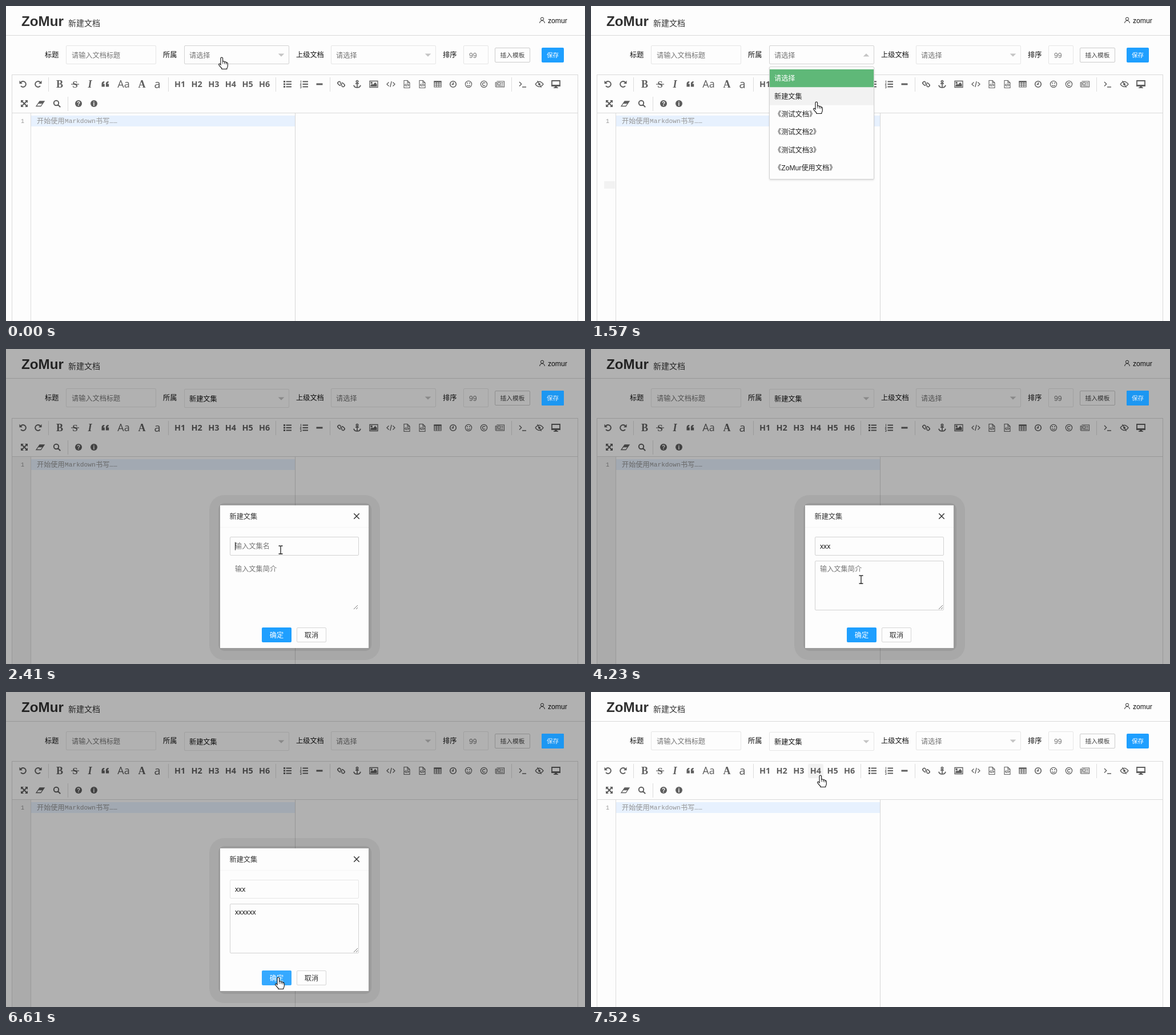
An HTML page with a canvas for the animation above (8000 ms loop, 1014 by 552 pixels).

```html
<!DOCTYPE html>
<html lang="zh-CN">
<head>
<meta charset="utf-8">
<title>新建文档</title>
<style>
html, body { margin: 0; width: 100%; height: 100%; overflow: hidden; background: #fdfdfd; }
canvas { display: block; }
</style>
</head>
<body>
<canvas id="stage" width="1014" height="552"></canvas>
<script>
const W = 1014, H = 552, LOOP = 8000;
const screen2d = document.getElementById('stage').getContext('2d');
const layer = document.createElement('canvas');
layer.width = W;
layer.height = H;
const layer2d = layer.getContext('2d');
let g = screen2d;

const SANS = '"Liberation Sans", "Noto Sans CJK SC", "Noto Sans CJK", sans-serif';
const MONO = '"Liberation Mono", "Noto Sans CJK SC", monospace';
const SERIF = '"Liberation Serif", serif';
const OPEN = '"Open Sans", sans-serif';
const PAPER = '#fdfdfd', BLUE = '#1e9fff', ICON = '#5e5e5e', HINT = '#757575';
const LIGHT = '#e6e6e6', DARK = '#d2d2d2';
const SIZE = 12.2;

const STEPS = [0, 400, 670, 800, 920, 1050, 1180, 1570, 1720, 1840, 1960, 2080, 2260, 2410,
  2970, 3250, 3430, 3620, 3800, 4080, 4230, 4350, 4470, 4640, 4790, 4940, 5210, 5330, 5460,
  5730, 5880, 6000, 6120, 6270, 6440, 6610, 6730, 6880, 7000, 7150, 7330, 7520];

// Pointer path: time, x, y.
const POINTER = [[0, 378, 90], [399, 378, 90], [400, 393, 83], [800, 393, 83], [1180, 395, 162],
  [1570, 395, 168], [1840, 394, 169], [2260, 481, 352], [3620, 481, 352], [3800, 481, 362],
  [4230, 473, 404], [5600, 473, 404], [6270, 477, 496], [6610, 477, 500], [6800, 477, 500],
  [7520, 402, 146]];

const NAME_KEYS = [3250, 3430, 3620];
const NOTE_KEYS = [4640, 4790, 4940, 5210, 5330, 5460];

const clamp = u => Math.max(0, Math.min(1, u));
const ease = (t, start, span) => 1 - (1 - clamp((t - start) / span)) ** 2.2;
const typed = (keys, t) => 'x'.repeat(keys.filter(k => k <= t).length);

function pointerAt(t) {
  const i = POINTER.findIndex(p => p[0] > t);
  if (i < 0) return POINTER[POINTER.length - 1].slice(1);
  const [t0, x0, y0] = POINTER[i - 1], [t1, x1, y1] = POINTER[i];
  const u = (t - t0) / (t1 - t0);
  return [x0 + (x1 - x0) * u, y0 + (y1 - y0) * u];
}

function text(s, x, cy, { size = SIZE, color = '#222', font = SANS, weight = '', align = 'left' } = {}) {
  g.font = `${weight} ${size}px ${font}`;
  g.fillStyle = color;
  g.textAlign = align;
  g.fillText(s, x, cy + size * 0.37);
}

function fill(x, y, w, h, color, r = 0) {
  g.fillStyle = color;
  g.beginPath();
  g.roundRect(x, y, w, h, r);
  g.fill();
}

function box(x, y, w, h, border, back = PAPER) {
  fill(x, y, w, h, back, 2);
  if (!border) return;
  g.strokeStyle = border;
  g.lineWidth = 1;
  g.beginPath();
  g.roundRect(x + 0.5, y + 0.5, w - 1, h - 1, 1.5);
  g.stroke();
}

function shape(x, y, { stroke, solid, width = 1.3, color = ICON, flip = 1 }) {
  g.save();
  g.translate(x, y);
  g.scale(flip, 1);
  g.lineWidth = width;
  g.strokeStyle = g.fillStyle = color;
  if (solid) g.fill(new Path2D(solid));
  if (stroke) g.stroke(new Path2D(stroke));
  g.restore();
}

const ring = r => `M${r} 0a${r} ${r} 0 1 1 ${-2 * r} 0a${r} ${r} 0 1 1 ${2 * r} 0`;
const turn = { stroke: 'M-4-3.2A5 5 0 1 1-4 3.2', solid: 'M-6.5-6.2v5.4h5.4z', width: 2 };
const lines = 'M-2.5-5.5h9.5v2h-9.5zM-2.5-1h9.5v2h-9.5zM-2.5 3.5h9.5v2h-9.5z';
const fileCode = {
  stroke: 'M-5-6.5h6l4 4v9h-10zM1-6.5v4h4M-1.5-.5l-2 2 2 2M1.5-.5l2 2-2 2M.5-.9l-1 4.8', width: 1.1
};

const ROW1 = [
  [30, turn],
  [56, { ...turn, flip: -1 }],
  [174, { solid: 'M-6.5-.5q0-4.5 4.8-4.5v2q-2 .5-2 2.5h2.5v5h-5.3zM.9-.5q0-4.5 4.8-4.5v2q-2 .5-2 2.5h2.5v5h-5.3z' }],
  [493, { solid: lines + 'M-7-6h3v3h-3zM-7-1.5h3v3h-3zM-7 3h3v3h-3z' }],
  [522, { solid: lines, stroke: 'M-5.5-6.5v4M-7-1h2.2l-2 2.6h2.2M-7 3.5h2v3h-2', width: 1 }],
  [549, { solid: 'M-5.5-1.5h11v3h-11z' }],
  [587, { stroke: 'M-.5-2.5L-2-4a2 2 0 0 0-2.8 0l-.7.7a2 2 0 0 0 0 2.8l2 2a2 2 0 0 0 2.8 0M.5 2.5L2 4a2 2 0 0 0 2.8 0l.7-.7a2 2 0 0 0 0-2.8l-2-2a2 2 0 0 0-2.8 0M-1.6-1.6l3.2 3.2', width: 1.7 }],
  [615, { stroke: 'M0-3V6M-3-1.2h6M-6 1.8q1 4.2 6 4.2t6-4.2M1.7-4.8a1.7 1.7 0 1 1-3.4 0a1.7 1.7 0 1 1 3.4 0', width: 1.7 }],
  [644, { stroke: 'M-7-5.5h14v11h-14z', solid: 'M-5.5 4v-2.5l2.5-2.5 1.8 1.8 3.7-4 3 3.2v4zM-5.3-4h3v3h-3z' }],
  [674, { stroke: 'M-3.5-3.5L-7 0l3.5 3.5M3.5-3.5L7 0l-3.5 3.5M1.2-5l-2.4 10' }],
  [702, fileCode],
  [729, fileCode],
  [756, { stroke: 'M-6-5h12v10h-12zM-6-1h12M-6 2h12M-2-5v10M2-5v10', solid: 'M-6.5-5.5h13v2.5h-13z', width: 1.2 }],
  [783, { stroke: ring(5.3) + 'M.3-3.2v3.6h-2.8', width: 1.6 }],
  [810, { stroke: ring(5.6) + 'M-2.8 1.5q2.8 3 5.6 0', solid: 'M-2.8-2.8h1.7v1.7h-1.7zM1.1-2.8h1.7v1.7h-1.7z', width: 1.2 }],
  [837, { stroke: ring(5.6) + 'M2.2-1.6a2.6 2.6 0 1 0 0 3.2' }],
  [865, { stroke: 'M-5.5-5h13v10h-14q-1.2 0-1.2-1.5v-6.5h2.2v7M-3.5-3h4v4h-4zM2-2.5h4M2 0h4M-3.5 3h9.5', width: 1.1 }],
  [905, { stroke: 'M-6-4l3.7 3.7-3.7 3.7M-1 5h7', width: 1.4 }],
  [934, { stroke: 'M-7 0q7-9 14 0q-7 9-14 0M-3.5-6l7 12', solid: ring(2) }],
  [963, { stroke: 'M-7-6h14v9h-14z', solid: 'M-8 1h16v3h-16zM-2 3h4v2.5h2v1.5h-8v-1.5h2z', width: 1.8 }]
];
const ROW2 = [
  [32, { stroke: 'M-4-4L4 4M4-4L-4 4', solid: 'M-6-6h5l-5 5zM6-6v5l-5-5zM-6 6v-5l5 5zM6 6h-5l5-5z', width: 2 }],
  [60, { stroke: 'M-7 4.5l6-8.5h8l-6 8.5z', solid: 'M-4 .3l3-4.3h8l-3 4.3z' }],
  [89, { stroke: 'M3.2-1a4.2 4.2 0 1 1-8.4 0a4.2 4.2 0 1 1 8.4 0M2 2l4.2 4.2', width: 2 }],
  [127, { solid: ring(6) }],
  [154, { solid: ring(6) }]
];
const LETTERS = [['B', 94, SERIF, 18, 'bold'], ['S', 121, SERIF, 17, 'bold'], ['I', 147, SERIF, 18, 'italic bold'],
  ['Aa', 206, OPEN, 18, '500'], ['A', 238, SERIF, 18, 'bold'], ['a', 265, OPEN, 20, '500']];

function triangle(angle, cx, cy) {
  g.save();
  g.translate(cx, cy);
  g.rotate(angle);
  g.fillStyle = '#c4c4c4';
  g.fill(new Path2D('M-5.3-2.6h10.6L0 2.8z'));
  g.restore();
}

function saveButton(color, ink) {
  fill(938, 73, 39, 26, color, 2);
  text('保存', 957.5, 86, { size: 10.6, color: ink, align: 'center' });
}

function header() {
  text('ZoMur', 27, 26, { size: 24.2, weight: 'bold', color: '#303030' });
  text('新建文档', 109, 30, { size: 14, color: '#333' });
  shape(939, 25, { stroke: 'M2.6-2.4a2.6 2.6 0 1 1-5.2 0a2.6 2.6 0 1 1 5.2 0M-4.3 5q.3-4.4 4.3-4.4t4.3 4.4', width: 1, color: '#222' });
  text('zomur', 949, 25, { color: '#111' });
  fill(0, 51, W, 1, '#dadada');
}

function form(t) {
  const chosen = t >= 1720;
  const drop = chosen ? 1 : 0;
  for (const [s, x] of [['标题', 68], ['所属', 275], ['上级文档', 508], ['排序', 765]])
    text(s, x, 85.5, { color: '#111' });
  box(105, 69, 158, 33, LIGHT);
  text('请输入文档标题', 115, 86, { color: HINT });
  box(312, 69 + drop, 184, 33, t < 1840 ? DARK : LIGHT);
  text(chosen ? '新建文集' : '请选择', 321, 86 + drop, { color: chosen ? '#111' : HINT });
  const lift = t < 1600 ? ease(t, 620, 300) : 1 - clamp((t - 1660) / 120);
  triangle(Math.PI * lift, 482, 86 + drop);
  box(569, 69, 184, 33, LIGHT);
  text('请选择', 578, 86, { color: HINT });
  triangle(0, 739, 86);
  box(801, 69, 44, 33, LIGHT);
  text('99', 811, 86, { color: HINT });
  box(856, 73, 62, 26, '#cbcbcb');
  text('插入模板', 887, 86, { size: 10.7, color: '#444', align: 'center' });
  saveButton(BLUE, '#fff');
}

function editor(hoverH4) {
  g.strokeStyle = '#dadada';
  g.lineWidth = 1;
  g.strokeRect(10.5, 120.5, 991, 500);
  if (hoverH4) fill(380, 125, 27, 25, '#f1f1f1', 3);
  for (const x of [74, 284, 472, 567, 885]) fill(x, 125, 1, 25, '#dcdcdc');
  fill(108, 159, 1, 25, '#dcdcdc');
  for (const [x, icon] of ROW1) shape(x, 137, icon);
  for (const [x, icon] of ROW2) shape(x, 171, icon);
  for (const [s, x, font, size, weight] of LETTERS)
    text(s, x, 136.5, { font, size, weight, color: ICON, align: 'center' });
  fill(114, 136.5, 14, 1.2, ICON);
  for (let n = 1; n <= 6; n++)
    text('H' + n, 275 + 29.6 * n, 137, { font: OPEN, size: 14.4, weight: 'bold', color: ICON, align: 'center' });
  for (const [s, x] of [['?', 127], ['i', 154]])
    text(s, x, 171, { size: 10, weight: 'bold', color: '#fff', align: 'center' });

  fill(43, 188, 1, H, '#dcdcdc');
  fill(44, 192, 462, 19, '#e7f1fe');
  fill(10, 187, 991, 1, '#dadada');
  fill(506, 188, 1, H, '#d6d6d6');
  text('1', 29, 201, { size: 10, font: MONO, color: '#999', align: 'center' });
  const gray = { color: '#949494' };
  text('开始使用', 54, 201, gray);
  text('Markdown', 103, 201, { ...gray, size: 11.2, font: MONO });
  text('书写', 157, 201, gray);
  text('……', 181, 202.5, { size: 7, weight: 'bold', color: '#777' });
}

function dropdown(t, y) {
  const p = ease(t, 620, 300);
  const items = ['请选择', '新建文集', '《测试文档》', '《测试文档2》', '《测试文档3》', '《ZoMur使用文档》'];
  const hover = Math.floor((y - 111) / 31.4);
  g.save();
  g.globalAlpha = 0.3 + 0.7 * p;
  g.translate(0, 15 * (1 - p));
  g.shadowColor = 'rgba(0,0,0,.12)';
  g.shadowBlur = 3;
  g.shadowOffsetY = 1.5;
  fill(312, 106, 184, 198, PAPER, 2);
  g.shadowColor = 'transparent';
  box(312, 106, 184, 198, DARK);
  items.forEach((s, i) => {
    const top = 111 + 31.4 * i;
    if (i === 0) fill(313, top, 182, 31.4, '#5fb878');
    else if (i === hover) fill(313, top, 182, 31.4, '#f2f2f2');
    text(s, 321, top + 15.7, { color: i ? '#222' : '#fff' });
  });
  g.restore();
}

function field(value, hint, y, caret) {
  text(value || hint, 401, y, { color: value ? '#111' : HINT });
  if (caret) fill(401 + value.length * 6.1, y - 7, 1, 14, '#111');
}

function dialog(t, hoverOk) {
  g = layer2d;
  g.clearRect(0, 0, W, H);
  fill(356, 256, 299, 289, 'rgba(0,0,0,.05)', 26);
  fill(372, 270, 268, 259, 'rgba(0,0,0,.075)', 10);
  fill(375, 274, 260, 250, PAPER);
  text('新建文集', 391.5, 293, { color: '#333' });
  fill(375, 312, 260, 1, '#f5f5f5');
  shape(614, 293, { stroke: 'M-4.7-4.7l9.4 9.4M4.7-4.7l-9.4 9.4', width: 1.5, color: '#333' });
  box(392, 329, 226, 33, t < 2260 ? '' : t < 4350 ? DARK : LIGHT);
  box(392, 371, 226, 87, t < 4080 ? '' : DARK);
  const nameCaret = (t >= 2410 && t < 2970) || (t >= 3250 && t < 4080);
  field(typed(NAME_KEYS, t), '输入文集名', 345.5, nameCaret);
  field(typed(NOTE_KEYS, t), '输入文集简介', 385, t >= 4350 && t < 5730);
  shape(613, 452.5, { stroke: 'M-4 3.5l7-7M0 3.5l3-3', width: 1, color: '#777' });
  fill(448, 488, 52, 26, hoverOk ? '#35a9ff' : BLUE, 2);
  text('确定', 474, 501, { color: '#fff', align: 'center' });
  box(509, 488, 52, 26, '#d6d6d6');
  text('取消', 535, 501, { color: '#333', align: 'center' });
  g = screen2d;

  const shut = ease(t, 6716, 200), open = ease(t, 1645, 300);
  const scale = (0.5 + 0.5 * open) * (1 - 0.3 * shut);
  g.save();
  g.globalAlpha = open * (1 - shut);
  g.translate(505, 399);
  g.scale(scale, scale);
  g.drawImage(layer, -505, -399);
  g.restore();
}

const HAND = 'M-2 12V1.8a1.8 1.8 0 0 1 3.6 0V8q0-1.2 1.6-1.2t1.7 1.7q.4-1 1.7-.7t1.3 1.7q.5-.7 1.5-.2t.9 2V15q0 2-1.5 4.2V20.5H-.2v-1.5Q-2.4 17-5 13.6q-.9-1.8.5-2.4 1.2-.2 2.5 1.8z';
const ARROW = 'M0 0v14l3.2-3 2.1 5 2.3-1-2.1-4.8h4.4z';
const BEAM = 'M-3.5-7h2.3q1.2 0 1.2 1V6q0 1-1.2 1h-2.3M3.5-7h-2.3Q0-7 0-6V6q0 1 1.2 1h2.3';

function cursorKind(t, x, y) {
  if (t < 1720) return 'hand';
  if (t < 6730) {
    if (t >= 1840 && x > 392 && x < 618 && ((y > 329 && y < 362) || (y > 371 && y < 458))) return 'beam';
    return y > 487 ? 'hand' : 'arrow';
  }
  return t < 6880 || y < 160 ? 'hand' : y < 189 ? 'arrow' : 'beam';
}

function cursor(kind, x, y) {
  if (kind === 'beam') return shape(x, y, { stroke: BEAM, width: 1.3, color: '#222' });
  const d = kind === 'hand' ? HAND : ARROW;
  shape(x, y, { solid: d, color: '#fff' });
  shape(x, y, { stroke: d, width: 1.1, color: '#111' });
  if (kind === 'hand') shape(x, y, { stroke: 'M1.6 7.5v4M4.9 9v3M7.9 10v2.5', width: 0.9, color: '#333' });
}

function draw(t) {
  const [x, y] = pointerAt(t);
  const kind = cursorKind(t, x, y);
  fill(0, 0, W, H, PAPER);
  header();
  form(t);
  g.save();
  g.translate(0, t >= 1720 ? 1 : 0);
  editor(t >= 7520);
  g.restore();
  if (t >= 1180 && t < 1720) fill(23, 307, 19, 13, '#f2f2f2');
  if (t >= 670 && t < 1720) dropdown(t, y);
  if (t >= 1720 && t < 6730) {
    fill(0, 0, W, H, 'rgba(0,0,0,.3)');
    fill(11, 189, 32, H, 'rgba(0,0,0,.03)');
    if (t >= 1840) saveButton('#1c97f2', '#e4eef8');
  }
  if (t >= 1720 && t < 6880) dialog(t, kind === 'hand');
  cursor(kind, x, y);
}

let shown = -1;
function tick() {
  const now = performance.now() % LOOP;
  const t = STEPS.filter(s => s <= now).pop();
  if (t !== shown) draw(shown = t);
  requestAnimationFrame(tick);
}
tick();
</script>
</body>
</html>
```
